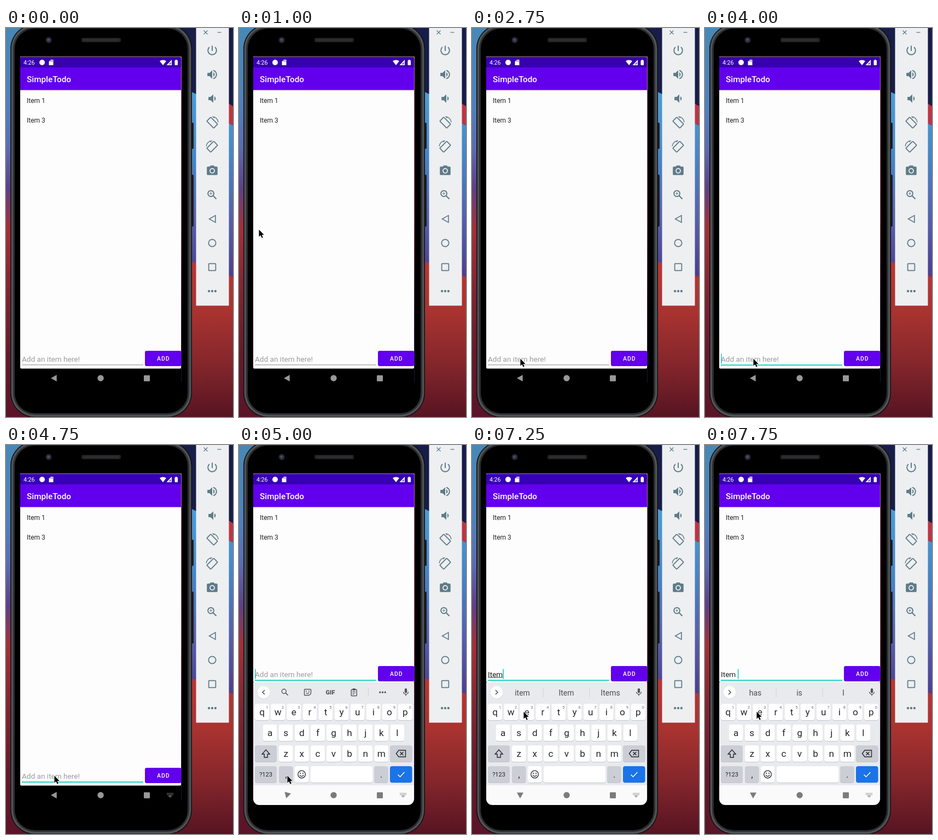
These frames come from a looping animation (415 by 711 pixels, 8000 ms). An HTML page with a canvas:

```html
<!DOCTYPE html>
<html lang="en">
<head>
<meta charset="utf-8">
<title>Todo app demo</title>
<style>
html, body { margin: 0; width: 100%; height: 100%; overflow: hidden; background: #000; }
canvas { display: block; width: 415px; height: 711px; }
</style>
</head>
<body>
<canvas id="stage"></canvas>
<script>
const W = 415, H = 711, LOOP = 8000, TAU = Math.PI * 2;
const FOCUS = 4000, OPEN = 5000, TYPE = 6500;
const canvas = document.getElementById('stage');
const dpr = window.devicePixelRatio || 1;
canvas.width = W * dpr;
canvas.height = H * dpr;
const c = canvas.getContext('2d');

// Pointer stops: [start ms, x, y]; the pointer jumps between them
const POINTER = [
  [250, 108, 345], [500, 24, 372], [1000, 36, 368], [1250, 70, 219], [1500, 57, 166],
  [1750, 77, 198.5], [2000, 68, 564], [2250, 88, 604], [5250, 95, 577], [5500, 94, 487]
];
const WORDS = [
  [7250, 'item', 'Item', 'Items'],
  [7500, 'Items', 'Item', 'Itemize'],
  [7750, 'has', 'is', 'I']
];
const at = (list, t) => list.filter(s => s[0] <= t).pop();

function typedText(t) {
  if (t < TYPE) return '';
  if (t < TYPE + 500) return 'I';
  return 'Item '.slice(0, 3 + Math.floor((t - TYPE - 500) / 250));
}
const caretOn = t => t >= FOCUS && (t >= TYPE || t % 1000 < 500);

function rect(x, y, w, h, color, r = 0) {
  c.fillStyle = color;
  c.beginPath();
  c.roundRect(x, y, w, h, r);
  c.fill();
}
function frame(x, y, w, h, r, color, width = 1.4) {
  c.strokeStyle = color;
  c.lineWidth = width;
  c.beginPath();
  c.roundRect(x, y, w, h, r);
  c.stroke();
}
function dot(x, y, r, color) {
  c.fillStyle = color;
  c.beginPath();
  c.arc(x, y, r, 0, TAU);
  c.fill();
}
function ring(x, y, r, color, width = 1.4, from = 0, to = TAU) {
  c.strokeStyle = color;
  c.lineWidth = width;
  c.beginPath();
  c.arc(x, y, r, from, to);
  c.stroke();
}
function trace(points, closed) {
  c.beginPath();
  points.forEach(p => c.lineTo(...p));
  if (closed) c.closePath();
}
function poly(points, color) {
  c.fillStyle = color;
  trace(points);
  c.fill();
}
function line(points, color, width = 1.4, closed = false) {
  c.strokeStyle = color;
  c.lineWidth = width;
  trace(points, closed);
  c.stroke();
}
function text(s, x, y, size, color, align = 'left', weight = 400) {
  c.font = `${weight} ${size}px Roboto, sans-serif`;
  c.textAlign = align;
  c.fillStyle = color;
  c.fillText(s, x, y);
}
function fade(y0, y1, ...colors) {
  const g = c.createLinearGradient(0, y0, 0, y1);
  colors.forEach((color, i) => g.addColorStop(i / (colors.length - 1), color));
  return g;
}
function dots(x, y, color, r, gap) {
  for (let i = -1; i < 2; i++) dot(x + i * gap, y, r, color);
}
function place(x, y, scale, paint) {
  c.save();
  c.translate(x, y);
  c.scale(scale, scale);
  paint();
  c.restore();
}

function wallpaper() {
  rect(0, 0, 200, 365, fade(0, 365, '#4788b6', '#4a85ba', '#4f80bd', '#5a6cb4', '#5e4088', '#a52f38'));
  rect(0, 365, 200, H - 365, fade(365, H, '#a52f38', '#802531', '#651a29', '#5a1428'));
  rect(200, 0, 215, H, '#171d48');
  poly([[330, 112], [348, 121], [407, 174], [W, 178], [W, 470], [330, 470]],
    fade(110, 470, '#4a9fd6', '#4587c8', '#5460ac', '#4c398a'));
  poly([[407, 138], [W, 143], [W, 178], [407, 174]], '#bc3544');
  poly([[200, 422], [340, 427], [407, 452], [W, 455], [W, H], [200, H]],
    fade(422, H, '#bb3634', '#a93330', '#84262b', '#561422'));
}

function phone() {
  rect(338, 173, 5, 48, '#1b1c1f', 2);
  rect(338, 268, 5, 95, '#1b1c1f', 2);
  [[0, '#0f1011'], [1.5, '#505356'], [5, '#2b2d2f'], [8, '#000']].forEach(([d, color]) =>
    rect(8 + d, d - 7, 332 - 2 * d, 719 - 2 * d, color, 45 - d));
  dot(78, 22, 5.5, '#26272d');
  dot(78, 22, 3.4, '#34364d');
  dot(77.5, 21.5, 1.5, '#565a80');
  rect(138, 18, 72, 8, '#222224', 3);
  rect(141, 20.5, 66, 3, '#303033', 1.5);
  rect(26, 52, 295, 1, '#9c7f95');
  rect(320, 53, 1, 595, fade(53, 648, '#b56a94', '#bd5a80', '#c04a6c', '#4c2444', '#1c1236'));
}

// Small icons, each drawn around its own centre on a 24 unit grid
function speaker(k, x) {
  poly([[x - 9, -3], [x - 5, -3], [x, -8], [x, 8], [x - 5, 3], [x - 9, 3]], k);
  c.beginPath();
  c.arc(x, 0, 4.5, -1.1, 1.1);
  c.fill();
}
function power(k) {
  ring(0, 0, 8, k, 2, -.86, Math.PI + .86);
  rect(-1, -9, 2, 10, k);
}
function loud(k) {
  speaker(k, 0);
  ring(0, 0, 8, k, 2, -1.3, 1.3);
}
function rotate(k, side) {
  c.scale(side, 1);
  ring(0, 0, 11.2, k, 1.5, -1.5, -.08);
  poly([[-.5, -12], [4.5, -9.5], [3.2, -8.1]], k);
  c.rotate(Math.PI / 4);
  frame(-9.2, -5.2, 18.4, 10.4, 1, k, 1.9);
}
function camera(k) {
  rect(-10, -8, 20, 16, k, 2);
  poly([[-5, -7.5], [-3, -10], [3, -10], [5, -7.5]], k);
  ring(0, 0, 4.1, '#eeeff1', 1.8);
}
function search(k) {
  ring(-2.5, -2.5, 5.5, k, 2);
  line([[1.5, 1.5], [7.7, 7.7]], k, 2.2);
}
function zoom(k) {
  search(k);
  rect(-5, -3, 5, 1, k);
  rect(-3, -5, 1, 5, k);
}
function mic(k) {
  rect(-3, -10, 6, 12, k, 3);
  ring(0, -1, 6, k, 2, 0, Math.PI);
  rect(-1, 5, 2, 4, k);
}

function emulatorPanel() {
  const k = '#5d7b89';
  rect(347.5, 0, 60, 507.5, '#eeeff1');
  line([[361.5, 4.5], [368.5, 11.5]], k, 1.3);
  line([[368.5, 4.5], [361.5, 11.5]], k, 1.3);
  line([[386.5, 8], [393.5, 8]], k, 1.3);
  const tools = [
    power, loud, () => speaker(k, 2), () => rotate(k, 1), () => rotate(k, -1), camera, zoom,
    () => line([[-5.5, 0], [6, -6.5], [6, 6.5]], k, 1.7, true),
    () => ring(0, 0, 6.8, k, 1.8),
    () => frame(-6.5, -6.5, 13, 13, 1, k, 1.8),
    () => dots(0, 0, k, 2.2, 6)
  ];
  tools.forEach((tool, i) => place(377, 41 + 44 * i, .98, () => tool(k)));
}

function statusBar() {
  text('4:26', 32, 67, 10.7, '#fff');
  dot(66, 63, 5, '#fff');
  poly([[82, 58], [86.5, 58], [86.5, 68], [78.5, 68], [78.5, 61.5]], '#fff');
  for (let i = 0; i < 3; i++) rect(81.2 + i * 1.7, 59.3, .8, 2, '#3700b3');
  c.fillStyle = '#fff';
  c.beginPath();
  c.moveTo(287, 68);
  c.arc(287, 68, 9.5, -2.25, -.9);
  c.fill();
  poly([[303, 58], [303, 68], [293.5, 68]], '#fff');
  poly([[301.6, 62], [301.6, 66.6], [297.2, 66.6]], '#7a55cc');
  rect(308.5, 59, 5.5, 9, '#fff', 1);
  rect(310, 58, 2.5, 2, '#fff');
}

function inputRow(t, y) {
  const typed = typedText(t), base = y + 4.5;
  text(typed || 'Add an item here!', 29, base, 13.6, typed ? '#202020' : '#9c9c9c');
  const width = s => c.measureText(s).width;
  if (t >= 6750 && t < 7750) rect(29, y + 5.5, width(typed.trim()), 1, '#303030');
  if (caretOn(t)) rect(29.2 + width(typed), y - 9.5, 1.5, 18, '#03cdbb');
  if (t >= FOCUS) rect(29, y + 10.3, 222, 1.7, '#08cbbb');
  else rect(29, y + 10.3, 222, 1, '#8d8d8d');
  rect(254, y - 15, 66.5, 28, '#6200ee', 3);
  c.letterSpacing = '0.95px';
  text('ADD', 287.8, y + 3.3, 10.5, '#fff', 'center', 500);
  c.letterSpacing = '0px';
}

function toolbar(t) {
  const g = '#50545a', y = 452;
  const words = at(WORDS, t);
  const tip = words ? 2 : -2;
  dot(45, y + .7, 11.6, '#d3d5d9');
  dot(45, y, 11.4, '#fff');
  line([[45 - tip, y - 4], [45 + tip, y], [45 - tip, y + 4]], g, 1.6);
  place(305, y, .72, () => mic(g));
  if (words) {
    words.slice(1).forEach((w, i) => text(w, 92 + i * 80.5, y + 5.5, 14, '#4a4e53', 'center'));
    rect(129.5, y - 9, 1, 18, '#cfd1d5');
    rect(214.5, y - 9, 1, 18, '#cfd1d5');
    return;
  }
  place(84, y, .72, () => search(g));
  frame(119.5, 446.5, 12, 11, [1, 1, 5, 1], g);
  dot(123, 450, 1, g);
  dot(128, 450, 1, g);
  ring(125.2, 451.5, 2.6, g, 1.2, .2, 2.6);
  text('GIF', 167, y + 4, 11, g, 'center', 900);
  frame(205.2, 447, 10, 11.5, 1, g);
  rect(207.5, 445, 5.5, 3.5, g, 1);
  for (let i = 0; i < 3; i++) rect(207.3, 450 + i * 2.5, 5.5 - (i > 1) * 2, 1, g);
  rect(236, y - 8, 1, 16, '#cfd1d5');
  dots(262.5, y, g, 1.7, 4.7);
}

function keyboard(t) {
  const soft = '#cbced5', ink = '#25272b', pitch = 29.1;
  const rowY = r => 473 + r * 38;
  function key(x, row, w, color = '#fff') {
    rect(x, rowY(row) + 1, w, 30, '#c3c5ca', 4);
    rect(x, rowY(row), w, 30, color, 4);
  }
  rect(26, 434, 294, 188, '#e8eaee');
  toolbar(t);
  ['qwertyuiop', 'asdfghjkl', 'zxcvbnm'].forEach((row, r) => {
    [...row].forEach((ch, i) => {
      const x = 173 + (i - (row.length - 1) / 2) * pitch;
      key(x - 13, r, 26);
      text(ch, x, rowY(r) + 21, 17.2, ink, 'center');
      if (!r) text((i + 1) % 10, x + 9, rowY(r) + 8.5, 7.5, '#6a6e74', 'center');
    });
  });
  key(29, 2, 40, soft);
  key(276, 2, 40.5, soft);
  place(49.2, 564, 1, () =>
    line([[-3, 7], [-3, 1], [-7, 1], [0, -7], [7, 1], [3, 1], [3, 7]], ink, 1.4, true));
  place(297.5, 564, 1, () => {
    line([[-10, 0], [-5.5, -6], [7, -6], [7, 6], [-5.5, 6]], ink, 1.4, true);
    line([[-3, -3], [3, 3]], ink);
    line([[3, -3], [-3, 3]], ink);
  });
  key(29, 3, 40, soft);
  key(73, 3, 25.5, soft);
  key(102, 3, 25.5);
  key(131, 3, 113);
  key(247, 3, 25.5, soft);
  key(276, 3, 40.5, '#1a73e8');
  text('?123', 49, 606, 11, ink, 'center');
  text(',', 86, 608, 16, ink, 'center');
  text('.', 260, 608, 16, ink, 'center');
  place(114.6, 602, 1, () => {
    ring(0, 0, 6.8, ink, 1.3);
    dot(-2.4, -2, 1.1, ink);
    dot(2.4, -2, 1.1, ink);
    ring(0, .2, 3.4, ink, 1.3, .2, 2.94);
  });
  line([[290.5, 602.5], [294.5, 606.5], [302.5, 598]], '#fff', 1.5);
}

function navBar(t) {
  const open = t >= OPEN;
  const g = open ? '#7b7b7d' : '#98989a';
  if (open) rect(26, 622, 294, 36, '#fafafa', [0, 0, 11, 11]);
  place(88, 640, 1, () => {
    if (open) c.rotate(-TAU / 4 * (t < OPEN + 250 ? .83 : 1));
    poly([[-6, 0], [4.7, -6], [4.7, 6]], g);
  });
  dot(173, 640, 5.7, g);
  rect(252, 634.7, 11, 11, g, 1);
  if (t < 4500) return;
  for (let i = 0; i < 10; i++) rect(294.3 + i % 5 * 2.5, i < 5 ? 636 : 638.4, 1.4, 1.3, g);
  rect(297, 640.8, 6, 1.3, g);
  rect(298.7, 643, 2.6, 1, g);
}

function app(t) {
  const open = t >= OPEN;
  rect(26, 53, 294, open ? 381 : 569.5, '#fdfdfd', 2);
  rect(26, 53, 294, 19, '#3700b3', [2, 2, 0, 0]);
  rect(26, 72, 294, 41.5, '#6200ee');
  statusBar();
  text('SimpleTodo', 38, 99, 15.3, '#fff', 'left', 500);
  text('Item 1', 38, 136.5, 12, '#222');
  text('Item 3', 38, 172.5, 12, '#222');
  inputRow(t, open ? 419 : 605);
  if (open) keyboard(t);
  navBar(t);
}

function pointer(t) {
  const stop = at(POINTER, t);
  if (!stop) return;
  place(stop[1], stop[2], .93, () => {
    const arrow = [[.5, .5], [.5, 14.6], [3.7, 11.6], [6, 16.8], [8.4, 15.8], [6.1, 10.7], [10.4, 10.7]];
    c.lineJoin = 'round';
    line(arrow, '#fff', 1.6, true);
    poly(arrow, '#000');
  });
}

const start = performance.now();
function draw() {
  const t = (performance.now() - start) % LOOP;
  c.setTransform(dpr, 0, 0, dpr, 0, 0);
  wallpaper();
  phone();
  emulatorPanel();
  app(t);
  pointer(t);
  requestAnimationFrame(draw);
}
draw();
</script>
</body>
</html>
```
